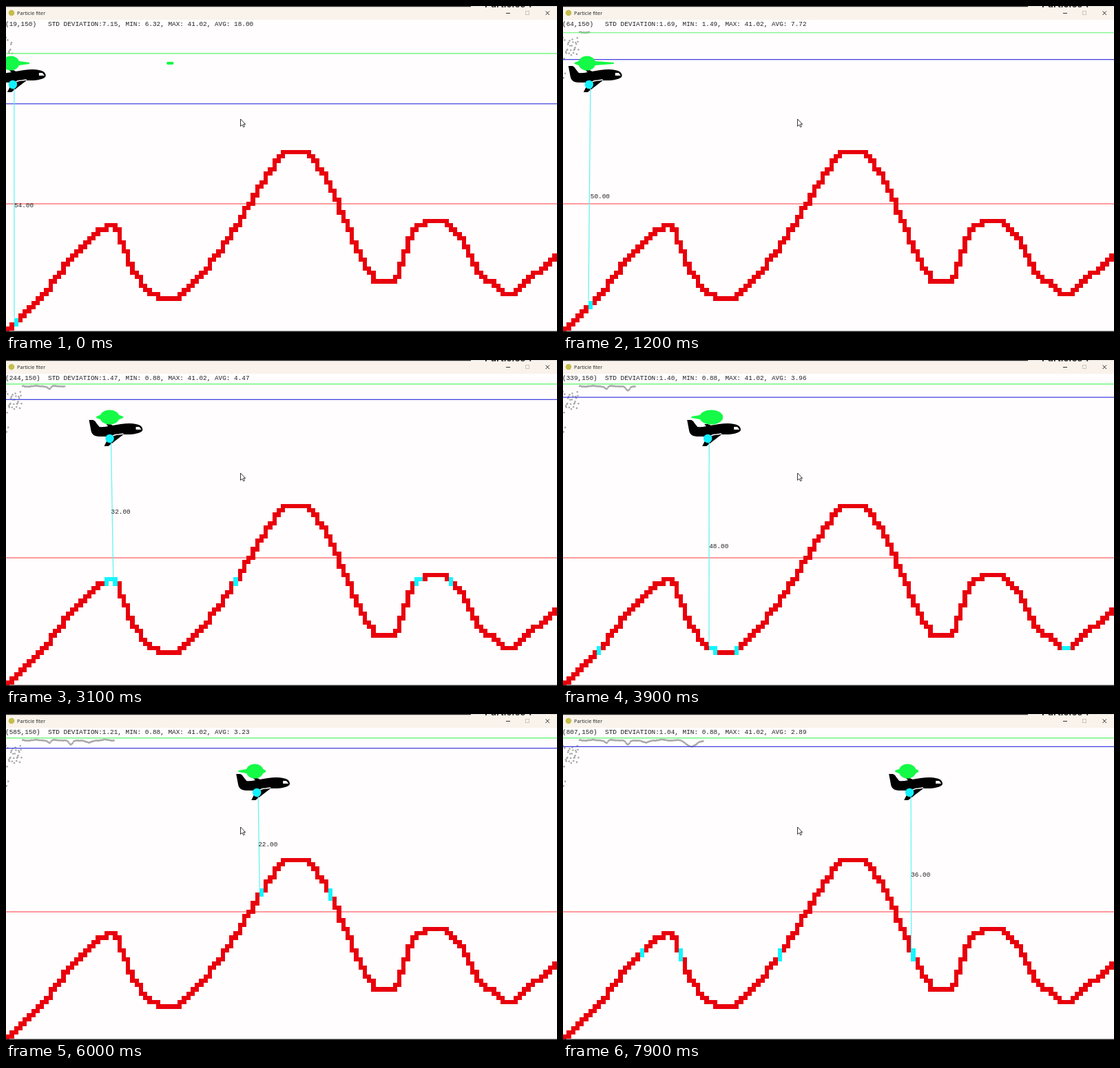
Animation of 800 by 473 pixels, one loop 8000 ms. Source, as an HTML page:

```html
<!DOCTYPE html>
<html lang="en">
<head>
<meta charset="utf-8">
<title>Particle filter</title>
<style>
  html, body { margin: 0; width: 100%; height: 100%; overflow: hidden; background: #fffdfd; }
  svg { display: block; width: 800px; height: 473px; }
  .mono { font: 9.4px "Liberation Mono", "Courier New", monospace; fill: #222; white-space: pre; }
</style>
</head>
<body>
<svg viewBox="0 0 800 473">
  <rect width="800" height="473" fill="#fffdfd"/>
  <rect width="800" height="20" fill="#f9f3eb"/>
  <rect width="675" height="1.2" fill="#222"/>
  <rect x="675" width="125" height="1" fill="#ddd"/>
  <text x="695" y="2" font-family="Inter, sans-serif" font-weight="600" font-size="14" fill="#222">Particles ?</text>
  <circle cx="8" cy="10" r="4.3" fill="#c5bd4c"/>
  <text x="16" y="13" font-family="'Open Sans', sans-serif" font-size="7.3" fill="#222">Particle fiter</text>
  <g fill="none" stroke="#333">
    <path d="M726 10.5h6M783.5 7.5l5.5 5.5M789 7.5l-5.5 5.5"/>
    <rect x="754.5" y="7.5" width="5" height="5" stroke="#ccc5bd"/>
  </g>

  <g id="trace" fill="#a9a9a9"></g>
  <path d="M0 287H800" stroke="#ff3b40" stroke-width="1.2"/>
  <path id="meanLine" d="M0 0H800" stroke="#4040e0" stroke-width="1.2"/>
  <path id="minLine" d="M0 0H800" stroke="#58f568" stroke-width="1.2"/>
  <g id="terrain" shape-rendering="crispEdges"></g>

  <g id="plane">
    <path d="M-30-27h6q3 1 5 5l4 5q5 1 13-1l18-3q14-2 22 0q7 1 9 5q2 4-1 6q-5 3-16 4h-10L-2 11h-6L-1-3h-15q-10-1-11-8ZM-5-21h5q5 1 8 6l-7 1Z"/>
    <path d="M2-2q4-4 11-4l7-1" fill="none" stroke="#fffdfd" stroke-width="1.6"/>
    <path d="M38-17h5l3 4h-8Z" fill="#fffdfd"/>
  </g>
  <g fill="#14fa46">
    <path id="tails"/>
    <ellipse id="core" cy="83" ry="10.5"/>
    <rect id="stray" x="233" y="81" width="10.5" height="4" rx="2"/>
  </g>
  <path id="beam" stroke="#66f4f4" stroke-width="1.3"/>
  <circle id="sensor" cy="114" r="6.2" fill="#14f0ff"/>

  <text id="range" class="mono"></text>
  <text id="position" class="mono" x="-1" y="29"></text>
  <text id="stats" class="mono" x="61" y="29"></text>
  <path d="M340.5 164v10.5l2.4-2.2 1.8 3.4 1.7-.8-1.7-3.3h3Z" fill="#fff" stroke="#222" stroke-width=".9"/>
  <rect y="471.6" width="800" height="1.4" fill="#222"/>
</svg>
<script>
const LOOP = 8000, STEP = 100, CELL = 6.25, COLUMNS = 128;
const $ = id => document.getElementById(id);
const bump = (p, center, width) => Math.exp(-(((p - center) / width) ** 2));
const decay = (p, span) => Math.exp(-p / span);

function set(el, attrs) {
  for (const key in attrs) el.setAttribute(key, attrs[key]);
  return el;
}
function add(parent, tag, attrs) {
  return set(parent.appendChild(document.createElementNS("http://www.w3.org/2000/svg", tag)), attrs);
}

// Smooth curve through [position, value] points.
function smooth(points, p) {
  const last = points.length - 1;
  const slope = i => {
    const a = points[Math.max(0, i - 1)], b = points[Math.min(last, i + 1)];
    return (b[1] - a[1]) / (b[0] - a[0]);
  };
  let i = 0;
  while (i < last - 1 && points[i + 1][0] < p) i++;
  const [a, va] = points[i], [b, vb] = points[i + 1];
  const d = b - a, k = (p - a) / d, j = 1 - k;
  return va * j * j * (1 + 2 * k) + vb * k * k * (3 - 2 * k)
    + d * k * j * (slope(i) * j - slope(i + 1) * k);
}

function random(seed) {
  return () => (seed = (seed * 16807) % 2147483647) / 2147483647;
}

// The ground curve in cells; every column fills the cells the curve crosses.
const ground = [[0, 57.2], [9, 48.2], [16, 39.3], [23, 33.05], [26, 33.05], [27, 36.2], [30, 43.1],
  [34, 48.2], [38, 49.8], [42, 47.6], [50, 38.2], [60, 22.3], [65, 15.9], [70, 15.9], [75, 22.3],
  [81, 36.2], [86, 45.1], [88.5, 45.7], [91, 44.8], [94, 35.3], [98, 31.7], [102, 31.8],
  [106, 35.6], [110, 43], [116, 48.1], [118, 48.3], [128, 39.2]];
const depthY = cells => 115 + CELL * cells;
const columns = Array.from({ length: COLUMNS }, (_, c) => {
  const ends = [smooth(ground, c), smooth(ground, c + 1)];
  const top = Math.floor(Math.min(...ends)), bottom = Math.floor(Math.max(...ends)) + 1;
  const bar = add($("terrain"), "rect", {
    x: CELL * c - 1, y: depthY(top), width: CELL + (c === COLUMNS - 1 ? 1 : 0.2), height: CELL * (bottom - top)
  });
  return { top, bar };
});

// Error history: a loose scatter that settles into a wavy line with a few dips.
const rand = random(11);
const dots = [];
function addDot(x, y) {
  dots.push({ x, el: add($("trace"), "circle", { cx: x, cy: y, r: 1.3 }) });
}
for (let x = 0; x < 23; x += 0.8) addDot(x, 46 + rand() * (30 + 150 * decay(x, 2)));
for (let x = 24; x < 206; x += 1.3) {
  const dips = 4 * bump(x, 63, 3) + 7 * bump(x, 94, 4) + 4 * bump(x, 120, 6) + 9 * bump(x, 187, 11);
  addDot(x, 38 + dips + 0.6 * Math.sin(x / 4) + 0.8 * (rand() - 0.5));
}

const route = [[0, 19], [1.2, 63.6], [2.3, 153.4], [3.9, 339], [5.1, 474], [6, 585], [7.9, 807]];
const LEAD = 0.017;
const errorY = error => 29.4 + CELL * error;

function render(t) {
  const travel = smooth(route, t);
  const x = travel * 0.626 - 2;
  const samples = 9 + 24.7 * t;
  const mean = (248 + 43.3 * t - 86 * decay(t, 0.3)) / samples;
  const min = Math.max(0.88, 1.91 - 0.355 * t) + 4.41 * decay(t, 0.2);
  const deviation = 1.75 - 0.09 * t + 5.4 * decay(t, 0.25);

  const column = Math.round(smooth(route, t + LEAD) / 10);
  const range = columns[column].top;
  const endY = depthY(range);
  for (const { top, bar } of columns) set(bar, { fill: top === range ? "#14f5ff" : "#e8000c" });

  set($("plane"), { transform: `translate(${x} 114)` });
  set($("sensor"), { cx: x });
  set($("beam"), { d: `M${x + 2} 120L${CELL * column - 0.5} ${endY}` });

  // The particle cloud sways around the plane and its tails swell in turn.
  const sway = bump(t, 3.9, 0.8);
  const center = x - 3 + 8 * sway, r = 12.5 + 4.5 * sway;
  const left = center - 18 - 24 * bump(t, 4.8, 1), right = center + 16 + 23 * bump(t, 1.2, 1.4);
  set($("core"), { cx: center, rx: r });
  set($("tails"), { d: `M${left} 82L${center - r} 80H${center + r}L${right} 82v2
    L${center + r} 86H${center - r}L${left} 84Z` });
  set($("stray"), { visibility: t < 0.3 ? "visible" : "hidden" });

  for (const dot of dots) set(dot.el, { visibility: dot.x <= samples ? "visible" : "hidden" });
  set($("minLine"), { transform: `translate(0 ${errorY(min)})` });
  set($("meanLine"), { transform: `translate(0 ${errorY(mean)})` });

  set($("range"), { x: x + 2, y: (endY + 125) / 2 + 3 }).textContent = range.toFixed(2);
  $("position").textContent = `(${Math.round(travel)},150)`;
  $("stats").textContent = `STD DEVIATION:${deviation.toFixed(2)}, MIN: ${min.toFixed(2)}, `
    + `MAX: 41.02, AVG: ${mean.toFixed(2)}`;
}

const start = performance.now();
function tick() {
  const elapsed = (performance.now() - start) % LOOP;
  render(Math.floor(elapsed / STEP) * STEP / 1000);
  requestAnimationFrame(tick);
}
tick();
</script>
</body>
</html>
```
